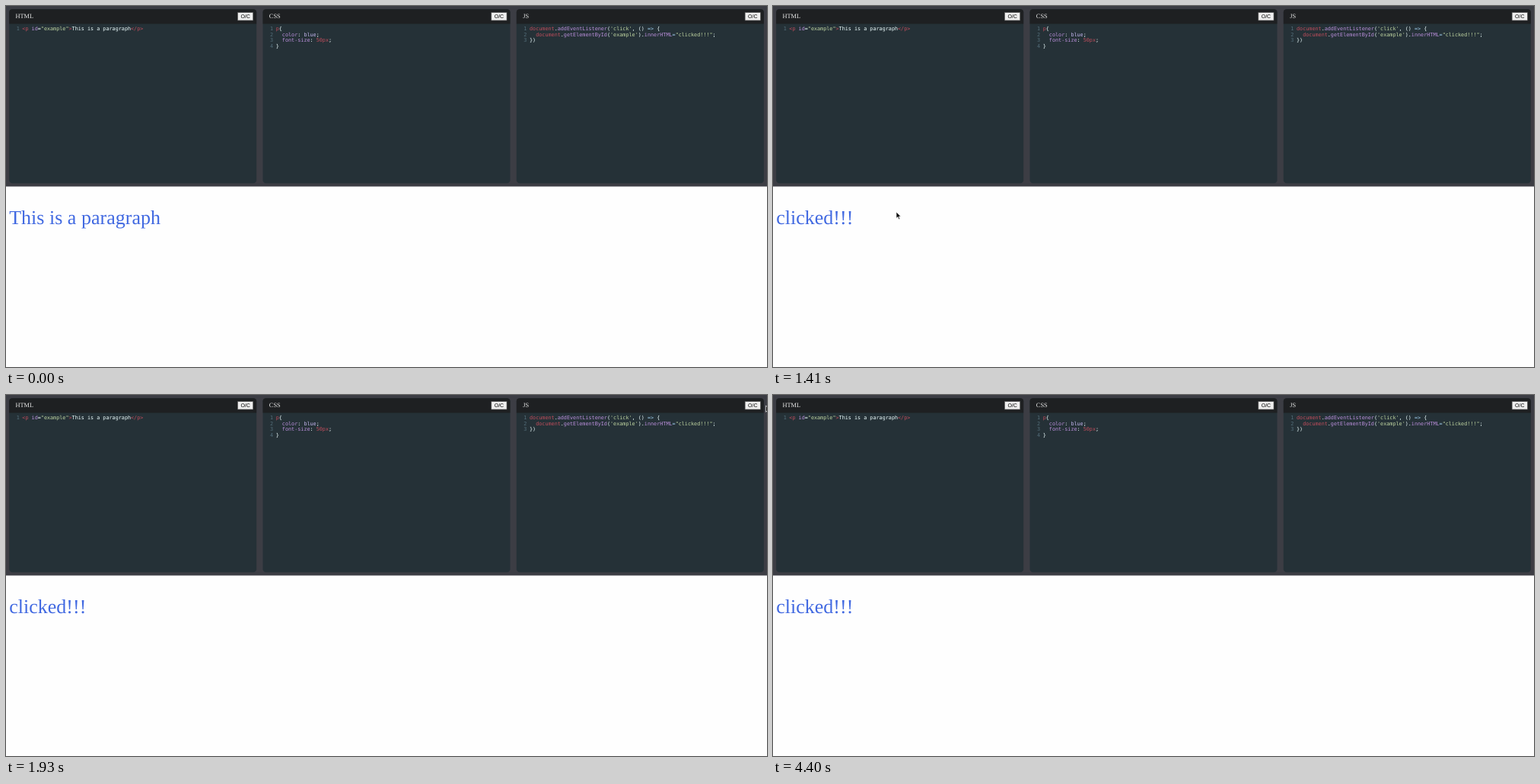
Recreate the animation shown at these times as an HTML page. Size 1000x475 px, loop 7130 ms.

```html
<!DOCTYPE html>
<html lang="en">
<head>
<meta charset="utf-8">
<title>Live code editor</title>
<style>
html, body { margin: 0; width: 100%; height: 100%; overflow: hidden; background: #fefefe; }
svg { display: block; width: 100vw; height: 100vh; }
text { white-space: pre; text-rendering: geometricPrecision; }
.title { font: 16px "Liberation Serif", serif; fill: #e9e9e9; }
.button { font: 13.333px "Liberation Sans", sans-serif; fill: #000; text-anchor: middle; }
.code { font: 13px "DejaVu Sans Mono", monospace; font-variant-ligatures: none; }
.number { fill: #546e7a; text-anchor: end; }
.output { font: 50px "Liberation Serif", serif; fill: #4169e1; }
</style>
</head>
<body>
<svg id="stage" viewBox="0 0 1920 912"></svg>
<script>
const LOOP = 7130;
const SCALE = 1.92; // layout units per stage pixel
const stage = document.getElementById('stage');

// token colours, chosen by the first letter of each token
const INK = { w: '#eeffff', r: '#c04d5c', p: '#bb8fdc', g: '#c0d6a2', b: '#9fcdec', l: '#c3b5ee' };

const PANELS = [
  ['HTML', [
    ['r<p ', 'pid', 'w=', 'g"example"', 'r>', 'wThis is a paragraph', 'r</p>']
  ]],
  ['CSS', [
    ['rp', 'w{'],
    ['w  ', 'pcolor', 'w: ', 'lblue', 'w;'],
    ['w  ', 'pfont-size', 'w: ', 'r50px', 'w;'],
    ['w}']
  ]],
  ['JS', [
    ['rdocument', 'w.', 'paddEventListener', 'w(', "g'click'", 'w, () ', 'b=>', 'w {'],
    ['w  ', 'rdocument', 'w.', 'pgetElementById', 'w(', "g'example'", 'w).', 'pinnerHTML', 'b=', 'g"clicked!!!"', 'w;'],
    ['w})']
  ]]
];

// start time, cursor shape, hot spot in stage pixels
const STEPS = [
  [0, ''],
  [500, 'beam', 148, 279],
  [630, 'arrow', 150, 275],
  [1410, 'arrow', 162, 271],
  [1540, 'arrow', 370, 238],
  [1670, 'arrow', 629, 180.3],
  [1800, 'arrow', 870, 78],
  [1930, 'arrow', 998.5, 14],
  [2190, 'arrow', 988, 6],
  [2320, 'arrow', 972.5, 0],
  [4400, '']
];
const CLICK = 630;

function add(parent, tag, attrs, content) {
  const el = document.createElementNS('http://www.w3.org/2000/svg', tag);
  for (const key in attrs) el.setAttribute(key, attrs[key]);
  if (content !== undefined) el.textContent = content;
  parent.appendChild(el);
  return el;
}

function rect(x, y, width, height, fill, more) {
  return add(stage, 'rect', { x, y, width, height, fill, ...more });
}

function label(cls, x, y, content) {
  return add(stage, 'text', { class: cls, x, y }, content);
}

function drawPanel([name, lines], i) {
  const x = 8 + i * 640;
  rect(x, 8, 624, 440, '#253137', { rx: 8 });
  add(stage, 'path', { d: `M${x} 45V16q0-8 8-8h608q8 0 8 8v29z`, fill: '#1e2022' });
  label('title', x + 16, 30.7, name);
  rect(x + 576.6, 16.6, 38.8, 19.8, '#efefef', { stroke: '#5c5c5c', 'stroke-width': 1.2 });
  label('button', x + 596, 31, 'O/C');
  lines.forEach((tokens, n) => {
    const y = 61 + n * 15;
    label('code number', x + 26, y, n + 1);
    const line = label('code', x + 33, y);
    for (const token of tokens) add(line, 'tspan', { fill: INK[token[0]] }, token.slice(1));
  });
}

rect(0, 0, 1920, 912, '#fefefe');
rect(0, 0, 1920, 456, '#3c3d44');
PANELS.forEach(drawPanel);
const output = label('output', 8, 551, '');

const cursors = {
  arrow: add(stage, 'path', {
    d: 'M0 0V16L3.9 12.6 6.5 18.6 9.2 17.4 6.6 11.6H11.6Z',
    fill: '#0a0a0a', stroke: '#f4f4f4', 'stroke-width': 1.4
  }),
  beam: add(stage, 'path', {
    d: 'M-3.5-8.5Q0-8.5 0-6Q0-8.5 3.5-8.5M0-6.5V6.5M-3.5 8.5Q0 8.5 0 6Q0 8.5 3.5 8.5M-2 3H2',
    fill: 'none', stroke: '#55585f', 'stroke-width': 1.4
  })
};

function frame(now) {
  const t = now % LOOP;
  const [, shape, x, y] = STEPS.filter(step => step[0] <= t).pop();
  const content = t < CLICK ? 'This is a paragraph' : 'clicked!!!';
  if (output.textContent !== content) output.textContent = content;
  for (const key in cursors) {
    const on = key === shape;
    cursors[key].setAttribute('visibility', on ? 'visible' : 'hidden');
    if (on) cursors[key].setAttribute('transform', `translate(${x * SCALE} ${y * SCALE})`);
  }
}

const start = performance.now();
function tick() {
  frame(performance.now() - start);
  requestAnimationFrame(tick);
}
tick();
</script>
</body>
</html>
```
